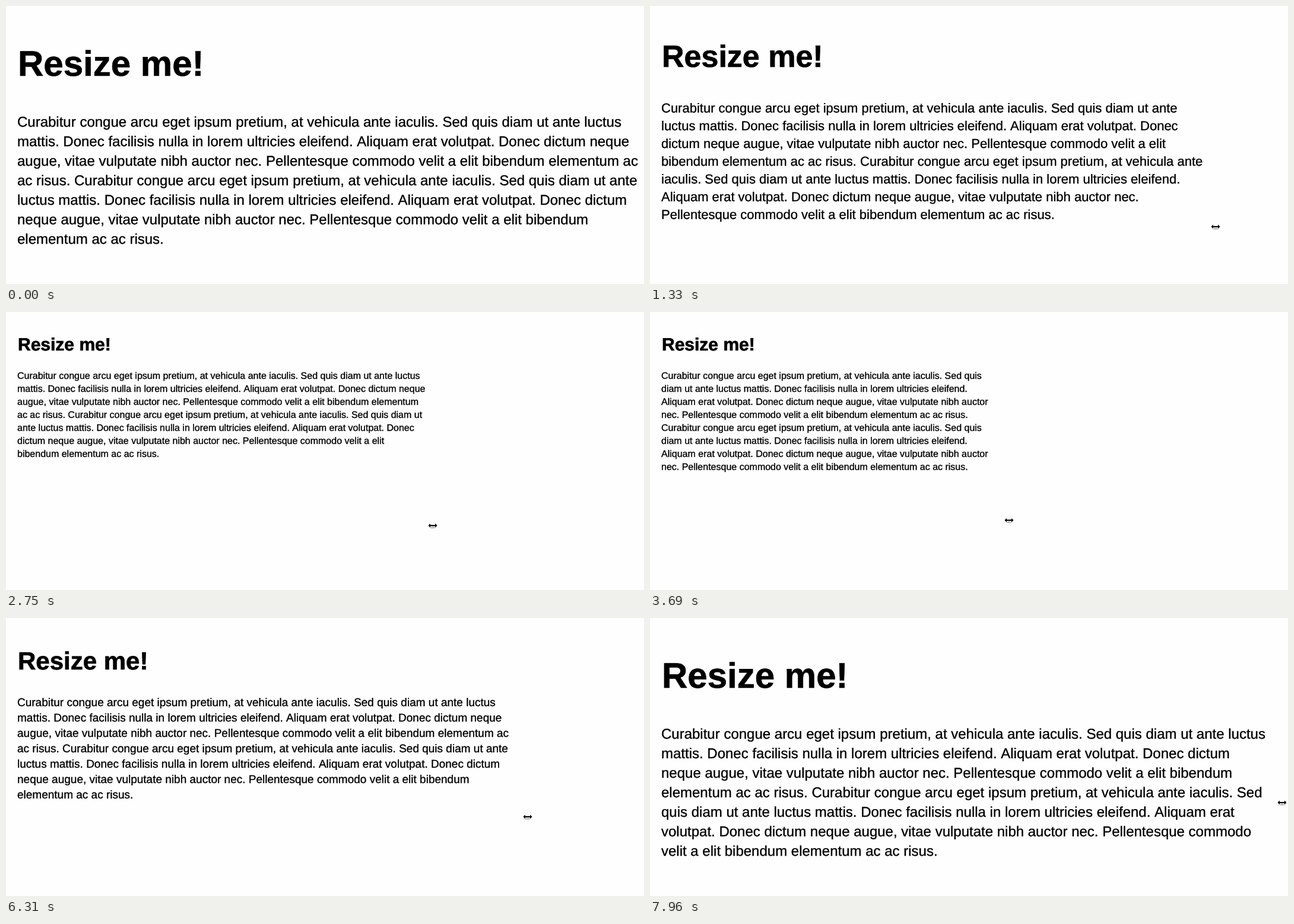
An HTML page that plays this animation: 1075 by 470 pixels, repeating every 8000 ms.

```html
<!DOCTYPE html>
<html lang="en">
<head>
<meta charset="utf-8">
<title>Resize me!</title>
<style>
  html, body { margin: 0; width: 100%; height: 100%; overflow: hidden; background: #fefefe; }
  h1, p {
    position: absolute; left: 19px; margin: 0; color: #000;
    font-family: "Liberation Sans", Arial, Helvetica, sans-serif;
    font-kerning: none; font-variant-ligatures: none; text-rendering: geometricPrecision;
  }
  h1 { left: 20px; white-space: nowrap; -webkit-text-stroke: 0.7px #000; }
  p { -webkit-text-stroke: 0.35px #000; }
  svg { position: absolute; left: -10px; top: -8px; overflow: visible; }
  #pointer { position: absolute; left: 0; top: 0; }
</style>
</head>
<body>
<h1>Resize me!</h1>
<p></p>
<div id="pointer">
  <svg width="20" height="16" viewBox="-10 -8 20 16">
    <ellipse cy="3" rx="6" ry="2" fill="#000" opacity=".25"/>
    <path d="M-7.5 0L-4-3.5V-1H4V-3.5L7.5 0L4 3.5V1H-4V3.5Z" fill="#000" stroke="#fff" stroke-width="1.2" paint-order="stroke"/>
  </svg>
</div>
<script>
const LOOP = 8000, START = 493, STEP = 118.4, LAG = 40;
const title = document.querySelector('h1');
const body = document.querySelector('p');
const pointer = document.getElementById('pointer');

const lorem = 'Curabitur congue arcu eget ipsum pretium, at vehicula ante iaculis. ' +
  'Sed quis diam ut ante luctus mattis. Donec facilisis nulla in lorem ultricies eleifend. ' +
  'Aliquam erat volutpat. Donec dictum neque augue, vitae vulputate nibh auctor nec. ' +
  'Pellentesque commodo velit a elit bibendum elementum ac ac risus. ';
body.textContent = (lorem + lorem).trim();

// Drag path: time, x, y
const path = [
  [380, 1092, 398], [1322, 953, 373], [2032, 831, 369], [3690, 605, 352],
  [4000, 591, 351], [5347, 727, 347], [6295, 879, 336], [7952, 1065, 312]
];
const last = path.length - 1;

const clamp = (v, a, b) => Math.min(b, Math.max(a, v));
const slope = (i, k) => (path[i + 1][k] - path[i][k]) / (path[i + 1][0] - path[i][0]);

// Harmonic tangents keep the curve from overshooting; both ends ease
function tangent(i, k) {
  if (i === 0 || i === last) return 0.6 * slope(i && i - 1, k);
  const a = slope(i - 1, k), b = slope(i, k);
  return a * b <= 0 ? 0 : 2 * a * b / (a + b);
}

function along(t, k) {
  t = clamp(t, path[0][0], path[last][0]);
  let i = 0;
  while (i < last - 1 && t > path[i + 1][0]) i++;
  const h = path[i + 1][0] - path[i][0], u = (t - path[i][0]) / h, v = 1 - u;
  return path[i][k] * (1 + 2 * u) * v * v + path[i + 1][k] * u * u * (3 - 2 * u) +
    h * u * v * (tangent(i, k) * v - tangent(i + 1, k) * u);
}

function setType(el, size, line, baseline) {
  const asc = Math.round(size * 0.905), desc = Math.round(size * 0.212);
  el.style.fontSize = size + 'px';
  el.style.lineHeight = line + 'px';
  el.style.top = Math.round(baseline) - asc - Math.floor((line - asc - desc) / 2) + 'px';
}

function draw(t) {
  const now = t < START ? 0 : t - (t - START) % STEP;
  const width = along(now - LAG, 1);
  const p = clamp((width - 768) / 256, 0, 1);
  const size = Math.round(16 + 8 * p), big = Math.round(30 + 30 * p);
  setType(title, big, big, 14.3 + 1.733 * big);
  setType(body, size, Math.round(size * 1.375), 22.4 + 3.04 * big);
  body.style.width = width - 37 + 'px';
  pointer.style.visibility = now ? 'visible' : 'hidden';
  pointer.style.transform = `translate(${Math.round(along(now, 1))}px, ${Math.round(along(now, 2))}px)`;
}

const start = performance.now();
function frame() {
  draw((performance.now() - start) % LOOP);
  requestAnimationFrame(frame);
}
draw(0);
requestAnimationFrame(frame);
</script>
</body>
</html>
```
